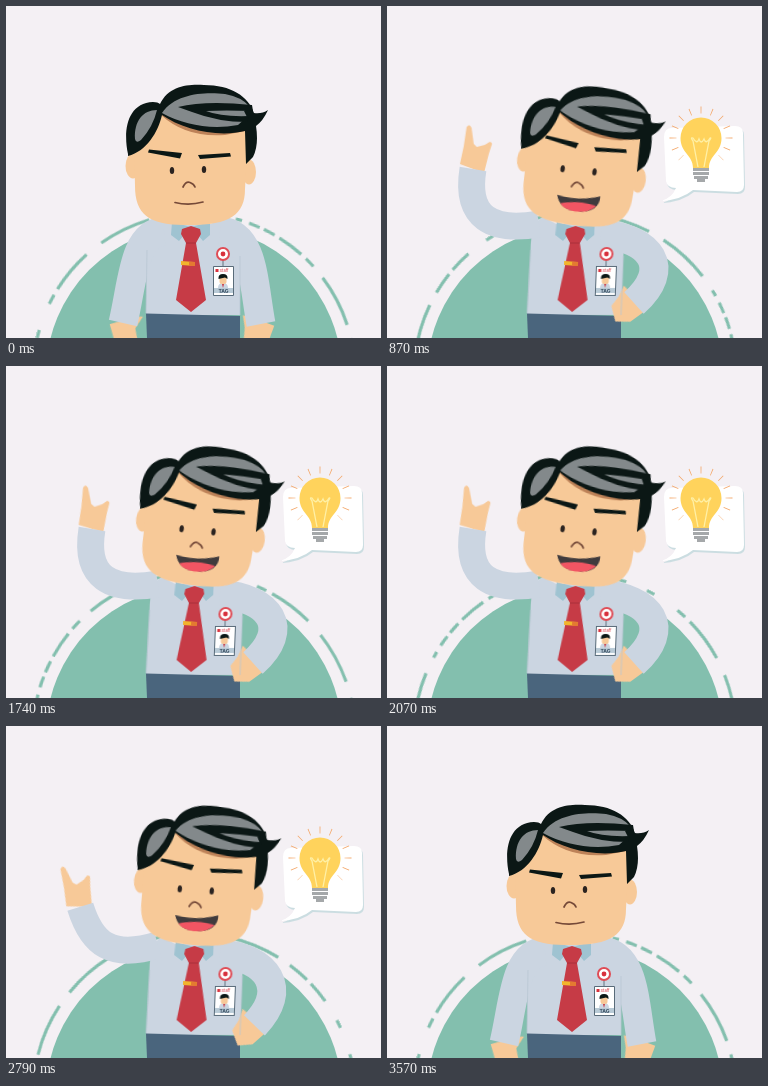
Recreate the animation shown at these times as an HTML page without scripts. Size 375 px wide and 332 px high, loop 3.6 s.

```html
<!DOCTYPE html>
<html lang="en">
<head>
<meta charset="utf-8">
<title>Man with an idea</title>
<style>
html, body { margin: 0; width: 100%; height: 100%; overflow: hidden; background: #f4f0f4; }
svg { display: block; width: 100%; height: 100%; }
svg * { animation: 3.6s linear infinite; }

.skin { fill: #f7c998; }
.shirt { fill: #cbd5e1; }
.sleeve { fill: none; stroke: #cbd5e1; stroke-width: 29; }
.hair { fill: #0b1715; }
.shine { fill: #83898b; }
.tie { fill: #c63b46; }
.collar { fill: #9fc3d1; }
.line { fill: none; stroke: #754938; stroke-width: 1.7; stroke-linecap: round; }
.seam { fill: none; stroke: #b9c7d4; stroke-width: .8; }
.balloon { fill: #fff; filter: drop-shadow(1px 2.5px 0 #cbdde1); }

.ring { fill: none; stroke: #83bfae; stroke-width: 3.2; transform-origin: 188px 368.5px; animation-name: spin; }
.torso { transform-origin: 185px 309px; animation-name: lean; }
.head { transform-origin: 175px 215px; animation-name: tilt; }
.brows { animation-name: brows; }
.bubble { transform-origin: 276px 195px; animation-name: pop; }
.arm-l { animation-name: arm-l; }
.hand-l { animation-name: hand-l; }
.arm-r { animation-name: arm-r; }
.hand-r { animation-name: hand-r; }
.point { animation-name: show-point; animation-timing-function: step-end; }
.fist { animation-name: show-fist; animation-timing-function: step-end; }
.smile { transform-origin: 186px 193px; animation-name: smile; }
.calm { animation-name: calm; animation-timing-function: step-end; }

@keyframes spin { from { transform: rotate(-167deg); } to { transform: rotate(13deg); } }

@keyframes lean {
  0%, 3%, 92%, 100% { transform: none; animation-timing-function: ease-in-out; }
  13.33% { transform: skewX(-.8deg); }
  22%, 76% { transform: skewX(-2.3deg); animation-timing-function: ease-in-out; }
}
@keyframes tilt {
  0%, 3%, 92%, 100% { transform: none; animation-timing-function: ease-in-out; }
  13.33% { transform: translate(0, 1px) rotate(4.5deg); }
  22%, 75% { transform: translate(3px, -1px) rotate(7.5deg); animation-timing-function: ease-in; }
  77.5% { transform: translate(2.8px, -1px) rotate(5.7deg); }
  82% { transform: translate(.5px, 1px) rotate(3.5deg); animation-timing-function: ease-out; }
}
@keyframes brows {
  0%, 5%, 92%, 100% { transform: none; }
  13.33% { transform: translate(.5px, -2px); }
  22%, 31% { transform: translate(2.5px, -10px); }
  37%, 76% { transform: translate(2px, -8.5px); }
}
@keyframes smile {
  0%, 14.2% { transform: scale(.7, .1); opacity: 0; }
  14.3% { transform: scale(.7, .1); opacity: 1; }
  20%, 78% { transform: none; opacity: 1; }
  82.4% { transform: scale(.7, .1); opacity: 1; }
  82.5%, 100% { transform: scale(.7, .1); opacity: 0; }
}
@keyframes calm { 0%, 82.5% { opacity: 1; } 14.3% { opacity: 0; } }

@keyframes pop {
  0%, 6.67% { transform: scale(0); animation-timing-function: ease-out; }
  13.33% { transform: rotate(-5deg) scale(1.07); animation-timing-function: ease-in-out; }
  20%, 77.5% { transform: none; animation-timing-function: ease-in-out; }
  80.5% { transform: rotate(-5deg) scale(1.09); animation-timing-function: ease-in; }
  86%, 100% { transform: scale(0); }
}

@keyframes arm-l {
  0%, 3%, 91%, 100% { d: path("M158 225C127 228 127 275 117 317"); stroke-width: 29; animation-timing-function: ease-in; }
  13.33% { d: path("M158 229C118 234 100 262 90 295"); stroke-width: 33; }
  14.17% { d: path("M155 227C118 240 95 258 62 255"); stroke-width: 31; }
  15% { d: path("M153 224C112 238 82 240 66 215"); stroke-width: 29; }
  16.67% { d: path("M152 220C108 230 77 222 78 185"); stroke-width: 27; animation-timing-function: ease-out; }
  23%, 75% { d: path("M152 218C105 226 78 212 86 163"); stroke-width: 27; }
  77.5% { d: path("M152 219C105 233 86 218 74.5 180"); stroke-width: 27; }
  80% { d: path("M153 224C112 238 85 240 55 240"); stroke-width: 29; }
  82% { d: path("M158 229C118 234 100 262 90 295"); stroke-width: 33; animation-timing-function: ease-out; }
}
@keyframes hand-l {
  0%, 3%, 91%, 100% { transform: translate(117px, 317px) rotate(-18deg); animation-timing-function: ease-in; }
  13.33% { transform: translate(90px, 295px) rotate(0deg); }
  14.17% { transform: translate(62px, 255px) rotate(88deg); }
  15% { transform: translate(66px, 215px) rotate(135deg); }
  16.67% { transform: translate(78px, 185px) rotate(166deg); animation-timing-function: ease-out; }
  23% { transform: translate(86px, 163px) rotate(180deg); }
  32%, 75% { transform: translate(86px, 163px) rotate(176deg); }
  77.5% { transform: translate(74.5px, 180px) rotate(161deg); }
  80% { transform: translate(55px, 240px) rotate(95deg); }
  82% { transform: translate(90px, 295px) rotate(0deg); animation-timing-function: ease-out; }
}
@keyframes show-point { 0%, 80.8% { opacity: 0; } 14.1% { opacity: 1; } }
@keyframes show-fist { 0%, 80.8% { opacity: 1; } 14.1% { opacity: 0; } }

@keyframes arm-r {
  0%, 3%, 91%, 100% { d: path("M214 225C248 228 247 275 255 318"); animation-timing-function: ease-in; }
  13.33% { d: path("M214 227C252 230 272 268 255 310"); animation-timing-function: ease-out; }
  21%, 75% { d: path("M214 228C264 232 286 262 247 297"); animation-timing-function: ease-in; }
  82% { d: path("M214 227C252 230 272 268 255 310"); animation-timing-function: ease-out; }
}
@keyframes hand-r {
  0%, 3%, 91%, 100% { transform: translate(255px, 318px) rotate(20deg); animation-timing-function: ease-in; }
  13.33% { transform: translate(255px, 310px) rotate(24deg); animation-timing-function: ease-out; }
  21%, 75% { transform: translate(247px, 297px) rotate(54deg); animation-timing-function: ease-in; }
  82% { transform: translate(255px, 310px) rotate(24deg); animation-timing-function: ease-out; }
}
</style>
</head>
<body>
<svg viewBox="0 0 375 332">
  <circle cx="188" cy="368.5" r="148" fill="#83bfae"/>
  <circle class="ring" cx="188" cy="368.5" r="161" pathLength="360"
    stroke-dasharray="3 10 3.6 2.4 16.1 6.7 19 6 19 6.2 2.3 2.7 4 1.7 4.3 2 9.7 2.3 3.8 5.2 19 5 8 2 8 8"/>

  <g class="bubble">
    <path class="balloon" d="M285 122L348 120Q356 120 356 127L357 179Q357 186 350 186L306 184Q294 194 274 195Q285 192 289 182Q280 182 279 175L277 131Q277 122 285 122Z"/>
    <path fill="none" stroke="#f3a566" stroke-width="7" pathLength="120" stroke-dasharray=".7 9.3" stroke-dashoffset=".35" d="M294.200 151.800A28 28 0 1 1 333.800 151.800"/>
    <path fill="#ffd35c" d="M306 162C306 149 293.500 147 293.500 132A20.500 20.500 0 0 1 334.500 132C334.500 147 322 149 322 162Z"/>
    <path fill="none" stroke="#fff0a6" stroke-width="1.3" d="M311 161L306 135Q303 131 306 132Q310 139 312 133Q314 139 317 133Q319 139 323 132Q325 131 322 135L317 161"/>
    <path fill="none" stroke="#a5a8aa" stroke-width="3" d="M306 163.500H322M306 167.500H322M307 171.500H321M310 174.500H318"/>
  </g>

  <g class="torso">
    <path class="shirt" d="M152 211Q140 216 141 245L140 309H234V245Q233 218 220 212L204 218H166Z"/>
  </g>
  <path fill="#4a657d" d="M140 307.500L234 310V332H141Z"/>

  <g class="hand-l skin">
    <path class="fist" d="M-13-3L13-2L21 0L10 9L8 25L-14 25Z"/>
    <path class="point" d="M13 5L9 23L6 42Q3 46 1 41L-1 25L-4 22L-12 24L-17 27Q-20 26-19 24L-16 15L-11-4Z"/>
  </g>
  <path class="arm-l sleeve" d="M158 225C127 228 127 275 117 317"/>
  <g class="hand-r">
    <path class="skin" d="M-13-3H13V14L4 26L-11 20L-14 9L-20-2Z"/>
  </g>
  <path class="arm-r sleeve" d="M214 225C248 228 247 275 255 318"/>

  <g class="torso">
    <path class="seam" d="M141 244L140 307M234 250V309"/>
    <path class="collar" d="M166 216L185 221L173 235L165 229ZM204 216L185 221L197 235L204 229Z"/>
    <path class="tie" d="M176 223L185 220L194 223L195 228L190 237L200 294L185 306L170 294L180 237L175 228Z"/>
    <path fill="none" stroke="#a92f3b" d="M180 237H190"/>
    <path fill="#f2b52c" d="M175 255L189 256V260L175 259Z"/>
    <path fill="#e47a31" d="M183 256L189 256V260L183 260Z"/>

    <path stroke="#657480" d="M217 253V262"/>
    <circle cx="217" cy="248" r="6" fill="#fff" stroke="#df4c55" stroke-width="2"/>
    <circle cx="217" cy="248" r="2.4" fill="#d8303c"/>
    <path fill="#fff" stroke="#596b79" d="M207.500 260.500H227.500V289.500H207.500Z"/>
    <rect x="209.500" y="263" width="3" height="3" fill="#d8303c"/>
    <text x="213.500" y="266" font-family="Inter, sans-serif" font-size="4" fill="#d8303c">Staff</text>
    <path fill="#b8cad6" d="M208 282H227V287H208Z"/>
    <path class="shirt" d="M212 282Q212 277 217 277Q222 277 222 282Z"/>
    <rect class="skin" x="213.500" y="270" width="7" height="8" rx="2.500"/>
    <path class="hair" d="M212.500 273Q212 268 217 268Q222 268 221.500 273L219 271.500Z"/>
    <path class="tie" d="M216 278H218L217 282Z"/>
    <text x="217.500" y="286.500" font-family="Inter, sans-serif" font-size="5" font-weight="700" text-anchor="middle" fill="#34495d">TAG</text>
  </g>

  <g class="head">
    <g class="skin">
      <ellipse cx="127" cy="160" rx="7.500" ry="12.500"/>
      <ellipse cx="243" cy="166" rx="7" ry="12.500"/>
      <path d="M128 135L129 180C129 208 143 219 178 219C222 220 239 210 239 183L243 112L155 100Z"/>
    </g>
    <path fill="#bd8258" d="M155 109Q180 132 219 129L239 125L210 112Z"/>
    <path class="hair" d="M122 148C117 125 121 97 147 96Q152 96 154 98C163 80 181 78 198 79C225 79 242 90 248 107Q256 108 262 104Q257 115 250 120Q253 139 247 151L240 158L239 125C211 132 176 123 156 109C152 126 141 145 122 150Z"/>
    <path class="shine" d="M129 133C128 115 137 104 151 104Q147 121 135 134Q130 138 129 133ZM156 107C170 86 202 86 219 88Q236 91 244 101L238 105L241 111L232 119C205 124 178 119 156 107Z"/>
    <path class="hair" d="M172 101Q200 94 246 99L247 105Q218 104 200 105Q215 111 243 110L241 116Q212 116 186 106Z"/>
    <g class="brows hair">
      <path d="M143 143.500L176 147L174 152.500L142 146.500Z"/>
      <path d="M192 149L224 147L225 150.500L194 153Z"/>
    </g>
    <g fill="#2b2320">
      <ellipse cx="166" cy="164.500" rx="2.200" ry="3.500"/>
      <ellipse cx="198" cy="163.500" rx="2.200" ry="3.500"/>
    </g>
    <path class="line" d="M177 181Q180 175 184 176.500Q188 178 189 181"/>
    <path class="line calm" d="M169 196.500Q183 200 197 196"/>
    <g class="smile">
      <path fill="#403b3d" d="M164 191Q185 195 207 187Q208 203 187 205Q168 206 164 191Z"/>
      <path fill="#f25563" d="M168 199Q187 193 204 197Q199 204 187 205Q174 206 168 199Z"/>
    </g>
  </g>
</svg>
</body>
</html>
```
